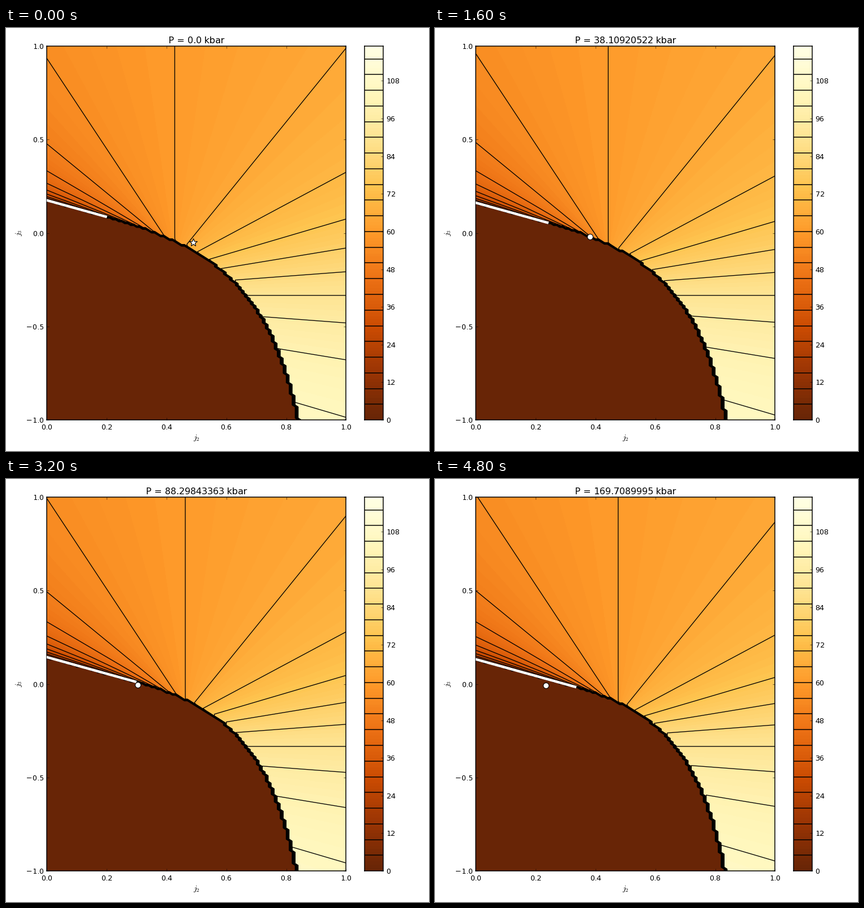
A matplotlib script that plays this animation: 748 px wide and 748 px high, repeating every 5600 ms.

```python
import numpy as np
import matplotlib.pyplot as plt
from matplotlib.animation import FuncAnimation

SIZE, DPI = 748, 80
EDGE = 1.36

plt.rcParams.update({
    "font.family": "DejaVu Sans", "font.size": 12, "mathtext.fontset": "cm",
    "text.hinting_factor": 1,
    "axes.titlesize": 14.4, "axes.titlepad": 5,
    "axes.linewidth": EDGE, "axes.axisbelow": False,
    "xtick.direction": "in", "ytick.direction": "in",
    "xtick.top": True, "ytick.right": True,
    "xtick.major.size": 4, "ytick.major.size": 4,
    "xtick.major.width": 0.5, "ytick.major.width": 0.5,
    "xtick.major.pad": 6, "ytick.major.pad": 4.7,
})

# pressure, fourth-neighbour coupling j4, and the marked (j2, j3) point
STATES = [
    ("0.0", -0.0363, 0.489, -0.050),
    ("12.97732956", -0.0342, 0.4455, -0.035),
    ("38.10920522", -0.0288, 0.382, -0.0195),
    ("67.8921358", -0.0203, 0.3287, -0.0075),
    ("88.29843363", -0.0187, 0.304, -0.0042),
    ("108.3532474", -0.0148, 0.2815, -0.0015),
    ("169.7089995", -0.0122, 0.234, -0.0078),
]
STAR_COUNT = 2
FILL = np.arange(120)
LINES = np.arange(0, 120, 5)
CMAP = "YlOrBr_r"

J2, J3 = np.meshgrid(np.linspace(0, 1, 101), np.linspace(-1, 1, 201))


def spiral_angle(j4):
    """Angle in degrees that minimises the energy of the spin chain."""
    best = np.full(J2.shape, np.inf)
    c = np.ones(J2.shape)
    for t in np.radians(np.arange(0, 125, 0.5)):
        e = (-np.cos(t) + J2 * np.cos(2 * t) + J3 * np.cos(3 * t)
             + j4 * np.cos(4 * t))
        lower = e < best
        best[lower] = e[lower]
        c[lower] = np.cos(t)
    inner = c < 1
    # Newton steps in cos(angle) refine the coarse minimum
    for _ in range(4):
        slope = -1 + 4 * J2 * c + J3 * (12 * c**2 - 3) + j4 * (32 * c**3 - 16 * c)
        curve = 4 * J2 + 24 * J3 * c + j4 * (96 * c**2 - 16)
        ok = inner & (curve > 1e-6)
        step = np.where(ok, slope / np.where(ok, curve, 1), 0)
        c = np.clip(c - np.clip(step, -0.02, 0.02), -1, 1)
    return np.degrees(np.arccos(c))


def box(left, top, right, bottom):
    return fig.add_axes([left / SIZE, 1 - bottom / SIZE,
                         (right - left) / SIZE, (bottom - top) / SIZE])


fig = plt.figure(figsize=(SIZE / DPI, SIZE / DPI), dpi=DPI, facecolor="white")

ax = box(72.3, 32.3, 601.3, 693.1)
ax.set(xlim=(0, 1), ylim=(-1, 1),
       xticks=np.linspace(0, 1, 6), yticks=np.linspace(-1, 1, 5))
ax.set_xlabel("$j_2$", labelpad=3.8)
ax.set_ylabel("$j_3$", labelpad=5)

bar = box(634.3, 32.3, 667.4, 693.1)
bar.pcolormesh([0, 1], FILL, (FILL[:-1, None] + 0.5), cmap=CMAP, vmin=0, vmax=119)
bar.hlines(LINES[1:], 0, 1, color="black", lw=EDGE)
bar.set(xlim=(0, 1), ylim=(0, 119), xticks=[], yticks=np.arange(0, 120, 12))
bar.yaxis.tick_right()

drawn = []


def draw(i):
    while drawn:
        drawn.pop().remove()
    pressure, j4, x, y = STATES[i]
    angle = spiral_angle(j4)
    drawn.append(ax.contourf(J2, J3, angle, FILL, cmap=CMAP, vmin=0, vmax=119))
    drawn.append(ax.contour(J2, J3, angle, LINES, colors="black", linewidths=1.2))

    # continuous transition, ending at the tricritical point
    ends = np.array([0, 0.4 + 5.6 * j4])
    drawn.extend(ax.plot(ends, (1 - 4 * ends - 16 * j4) / 9, color="white", lw=4,
                         solid_capstyle="projecting", zorder=3))

    shape, size = ("*", 13) if i < STAR_COUNT else ("o", 9)
    drawn.extend(ax.plot(x, y, shape, ms=size, mfc="white", mec="black",
                         mew=1, zorder=4))
    ax.set(xlim=(0, 1), ylim=(-1, 1))
    ax.set_title(f"P = {pressure} kbar")
    return drawn


anim = FuncAnimation(fig, draw, frames=len(STATES), init_func=lambda: draw(0),
                     interval=800, repeat=True, repeat_delay=0, blit=False)
plt.show()
```
